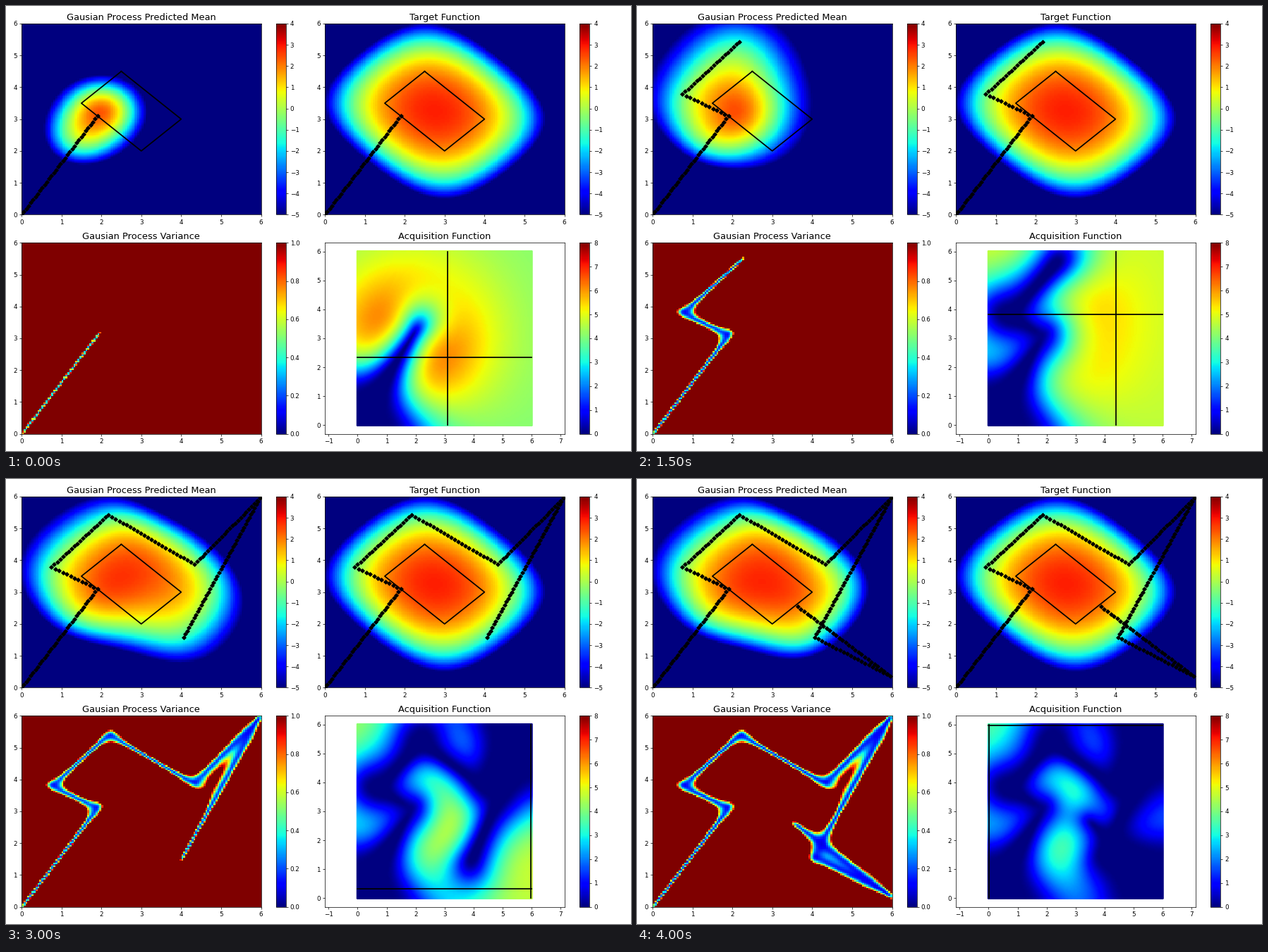
A matplotlib script for the animation above (6000 ms loop, 886 by 632 pixels).

```python
import math

import numpy as np
import matplotlib.pyplot as plt
from matplotlib.animation import FuncAnimation

W, H, DPI = 886, 632, 64
STEP = 0.11      # distance between samples on the path
SCALE = 1.57     # kernel length scale
NOISE = 1e-3     # noise relative to the data variance
N = 120          # grid resolution

WAYPOINTS = np.array([(0, 0), (1.9, 3.1), (0.75, 3.79), (2.18, 5.43), (4.33, 3.87),
                      (5.97, 5.95), (4.06, 1.58), (5.96, 0.36), (3.64, 2.54)])
GOALS = [(3.11, 2.33), (2.23, 5.49), (4.4, 3.82), (5.98, 5.96),
         (3.99, 1.5), (5.98, 0.32), (3.57, 2.6), (0.01, 5.97)]
STAGES = [0, 0, 1, 2, 3, 4, 5, 6, 7, 7, 7, 7]
REGION = np.array([(2.5, 4.5), (4, 3), (3, 2), (1.5, 3.5), (2.5, 4.5)])

axis = np.linspace(0, 6, N)
gx, gy = np.meshgrid(axis, axis)
grid = np.column_stack([gx.ravel(), gy.ravel()])


def target(p):
    """Smooth bump whose contours turn from ellipses into rounded rectangles."""
    dx, dy = p[:, 0] - 2.75, p[:, 1] - 3.25
    a = (dx + dy) / math.sqrt(2) / 2.32
    b = (dx - dy) / math.sqrt(2) / 2.63
    return 2.9 - 4.04 * (a**2 + b**2) - 3.31 * (a**4 + b**4) - 0.55 * (a**8 + b**8)


def walk(legs, extra=0):
    """Samples along the first legs, each leg overrunning by some extra steps."""
    parts = [WAYPOINTS[:1]]
    for p, q in zip(WAYPOINTS[:legs], WAYPOINTS[1:legs + 1]):
        n = max(1, round(math.hypot(*(q - p)) / STEP))
        t = np.arange(1, n + 1 + extra)[:, None] / n
        parts.append(p + (q - p) * t)
    return np.vstack(parts).clip(0, 6)


def kernel(p, q):
    """Matern 5/2 covariance."""
    d2 = ((p[:, None, :] - q[None, :, :]) ** 2).sum(axis=2)
    r = np.sqrt(5 * d2) / SCALE
    return (1 + r + r**2 / 3) * np.exp(-r)


erf = np.vectorize(math.erf)


def regress(pts):
    """Posterior mean, variance and expected improvement on the grid."""
    y = target(pts)
    mu, sd = y.mean(), y.std()
    k = kernel(pts, pts) + NOISE * np.eye(len(pts))
    ks = kernel(pts, grid)
    mean = mu + sd * (np.linalg.solve(k, (y - mu) / sd) @ ks)
    var = sd**2 * np.clip(1 - (ks * np.linalg.solve(k, ks)).sum(axis=0), 1e-9, None)
    s = np.sqrt(var)
    z = (mean - y.max()) / s
    pdf = np.exp(-z**2 / 2) / math.sqrt(2 * math.pi)
    cdf = 0.5 * (1 + erf(z / math.sqrt(2)))
    return mean.reshape(N, N), var.reshape(N, N), s * (pdf + z * cdf)


paths = [walk(i + 1) for i in range(len(GOALS))]
fields = [regress(walk(i + 1, extra=1)) for i in range(len(GOALS))]

plt.rcParams.update({
    "font.family": "DejaVu Sans", "font.size": 9.8, "axes.titlesize": 14.7,
    "axes.titlepad": 5.9, "axes.linewidth": 0.8, "image.cmap": "jet",
})
fig = plt.figure(figsize=(W / DPI, H / DPI), dpi=DPI, facecolor="white")


def box(x0, y0, x1, y1):
    return fig.add_axes([x0 / W, 1 - y1 / H, (x1 - x0) / W, (y1 - y0) / H])


def panel(x, y, title):
    ax = box(x, y, x + 339.5, y + 271.3)
    ax.set_title(title)
    return ax


def heatmap(ax, data, lo, hi):
    im = ax.imshow(data, origin="lower", extent=(0, 6, 0, 6), aspect="auto",
                   vmin=lo, vmax=hi, interpolation="nearest")
    ax.set_xticks(range(7))
    ax.set_yticks(range(7))
    return im


def bar(im, x, y, ticks):
    fig.colorbar(im, cax=box(x, y, x + 14, y + 271.3), ticks=ticks)


def trail(ax):
    ax.plot(*REGION.T, color="black", lw=1.95)
    return ax.plot([], [], "D", color="black", ms=4.6, mew=1)[0]


ax_mean = panel(22, 25, "Gausian Process Predicted Mean")
ax_target = panel(452, 25, "Target Function")
ax_var = panel(22, 336.3, "Gausian Process Variance")
ax_acq = panel(452, 336.3, "Acquisition Function")

im_mean = heatmap(ax_mean, fields[0][0], -5, 4)
im_target = heatmap(ax_target, target(grid).reshape(N, N), -5, 4)
im_var = heatmap(ax_var, fields[0][1], 0, 1)
dots = ax_acq.scatter(*grid.T, c=fields[0][2], s=16, linewidths=0,
                      cmap="jet", vmin=0, vmax=8)
trails = [trail(ax_mean), trail(ax_target)]
vline, = ax_acq.plot([], [], color="black", lw=1.95, zorder=3)
hline, = ax_acq.plot([], [], color="black", lw=1.95, zorder=3)

for ax in (ax_mean, ax_target):
    ax.set_xlim(0, 6)
    ax.set_ylim(0, 6)
ax_acq.set_xlim(-1.13, 7.13)
ax_acq.set_ylim(-0.3, 6.3)
ax_acq.set_xticks(range(-1, 8))
ax_acq.set_yticks(range(7))

bar(im_mean, 382.5, 25, range(-5, 5))
bar(im_target, 813, 25, range(-5, 5))
bar(im_var, 382.5, 336.3, np.linspace(0, 1, 6))
bar(dots, 813, 336.3, range(9))


def update(i):
    stage = STAGES[i]
    mean, var, gain = fields[stage]
    im_mean.set_data(mean)
    im_var.set_data(var)
    dots.set_array(gain)
    for line in trails:
        line.set_data(*paths[stage].T)
    x, y = GOALS[stage]
    vline.set_data([x, x], [0, 6])
    hline.set_data([0, 6], [y, y])
    return [im_mean, im_var, dots, vline, hline, *trails]


anim = FuncAnimation(fig, update, frames=len(STAGES), interval=500,
                     repeat=True, repeat_delay=0, blit=False)
plt.show()
```
